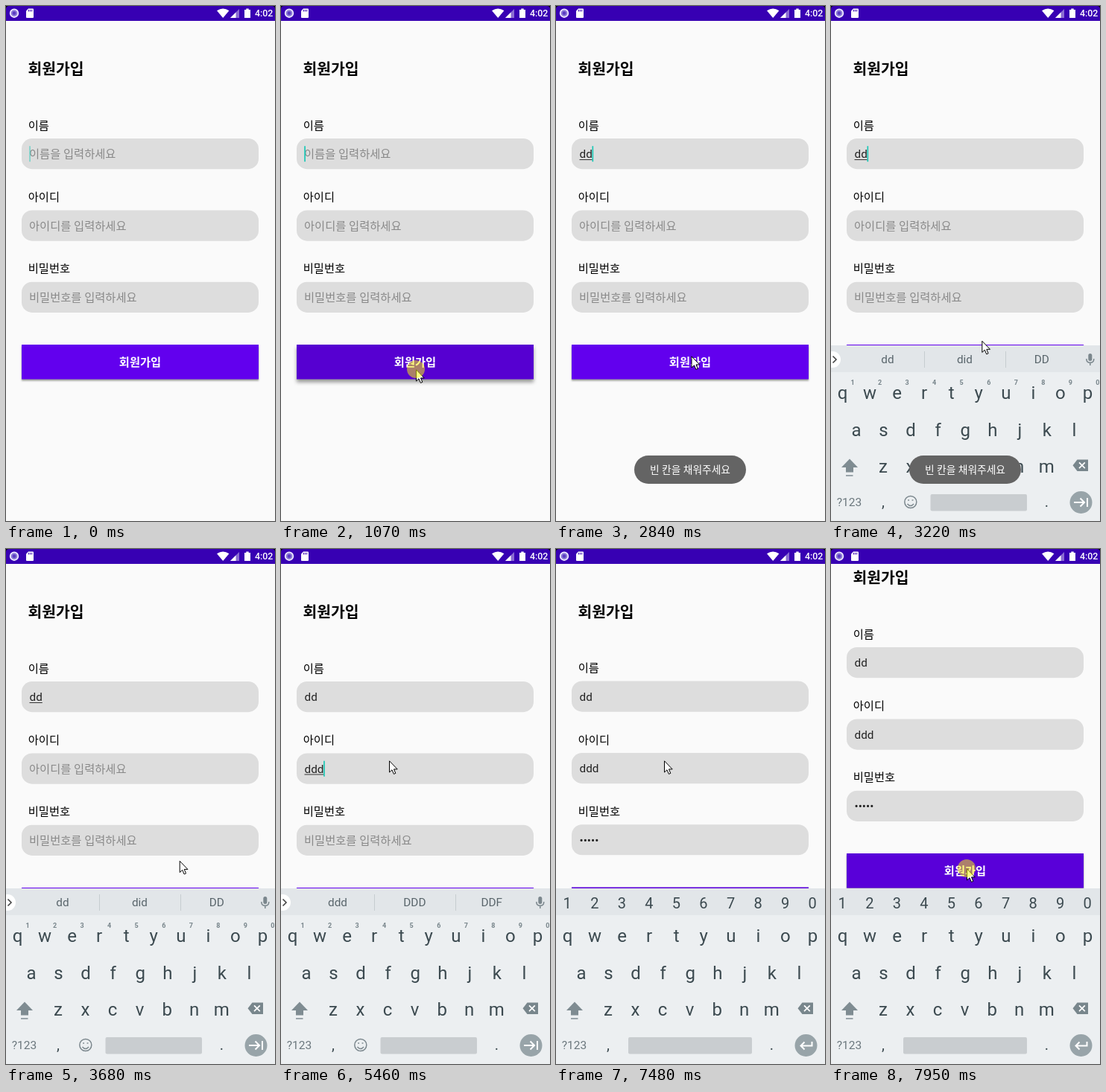
Write an HTML page that moves like this. It is 361 by 692 pixels and loops after 8 s.

```html
<!DOCTYPE html>
<html lang="ko">
<head>
<meta charset="utf-8">
<style>
html, body { margin: 0; width: 100%; height: 100%; overflow: hidden; background: #fafafa; }
svg { display: block; width: 361px; height: 692px; font: 15.3px Roboto, "Noto Sans CJK KR", "Noto Sans CJK", sans-serif; }
.bold { font-weight: 700; }
.hint { fill: #898989; }
.typed { fill: #222; }
.keys { font-size: 24px; fill: #3c4a50; text-anchor: middle; }
.mid { text-anchor: middle; }
#button { filter: drop-shadow(0 2px 1.2px rgba(0, 0, 0, .4)); }
</style>
</head>
<body>
<svg viewBox="0 0 361 692">
  <g id="page">
    <text class="bold" x="29.5" y="92.3" font-size="20.4">회원가입</text>
    <g id="fields"></g>
    <rect id="caret" width="1.7" height="21" fill="#1cc8b6"/>
    <g id="button">
      <rect x="21" y="455" width="318" height="46.5" fill="#6200ee"/>
      <rect id="press" x="21" y="455" width="318" height="46.5"/>
    </g>
    <text class="bold mid" x="180" y="483.7" fill="#fff">회원가입</text>
  </g>

  <g id="status">
    <rect width="361" height="20" fill="#3700b3"/>
    <path d="M0 0H4Q0 0 0 4ZM361 0V4Q361 0 357 0Z"/>
    <circle cx="11" cy="9.7" r="5.3" fill="#8f7ed6" stroke="#eeeaff" stroke-width="1.8"/>
    <circle cx="11" cy="9.7" r="2.4" fill="#5a3cc4"/>
    <path d="M30 3.5H36Q37 3.5 37 4.5V15Q37 16 36 16H28Q27 16 27 15V6.5Z" fill="#fff"/>
    <path d="M30.5 5V7.5M32.6 5V7.5M34.7 5V7.5" stroke="#3700b3"/>
    <path d="M291.2 16L283 6.3Q291.2 .8 299.4 6.3Z" fill="#fff"/>
    <path d="M301 16H313V4Z" fill="#8a6cd2"/>
    <path d="M301 16H308.5V8.5Z" fill="#fff"/>
    <path d="M320 5H322.3V3.5H325.7V5H328V16H320Z" fill="#fff"/>
    <text x="334" y="14.2" font-size="12.4" font-weight="500" fill="#fff">4:02</text>
  </g>

  <g id="keyboard">
    <rect y="456" width="361" height="236" fill="#eceff1"/>
    <rect y="456" width="361" height="36" fill="#e2e6e9"/>
    <g id="letters" class="keys"></g>
    <g id="plain">
      <circle cx="2" cy="475" r="11" fill="#fff"/>
      <path d="M2.5 470.5L7 475L2.5 479.5" fill="none" stroke="#444" stroke-width="1.6"/>
      <path d="M125.5 464V486M234.5 464V486" stroke="#c6ccd0"/>
      <g id="words" class="mid" fill="#59656b"></g>
      <rect x="345.3" y="467" width="5" height="10" rx="2.5" fill="#7b878d"/>
      <path d="M342.8 474Q342.8 479.3 347.8 479.3T352.8 474M347.8 479.3V483" fill="none" stroke="#7b878d" stroke-width="1.5"/>
      <g id="corner" class="mid bold" font-size="9" fill="#78858b"></g>
      <g fill="none" stroke="#7b878d" stroke-width="1.5">
        <circle cx="106.8" cy="666.5" r="8"/>
        <path d="M102.5 669Q106.8 674 111 669M103.2 664H105M108.6 664H110.4"/>
      </g>
    </g>
    <g id="digits" class="keys" style="font-size:20px"></g>
    <path d="M25 608.5L36 620H30V626.5H20V620H14ZM20 630.3H29.5V631.7H20Z" fill="#7f8c92"/>
    <path d="M330.5 609.5H345V625H330.5L324.5 617.2Z" fill="#78868c"/>
    <path d="M333 613.3L340.8 621.1M340.8 613.3L333 621.1" stroke="#fff" stroke-width="1.7"/>
    <text class="mid" x="24.5" y="672" font-size="15.5" fill="#6b777d">?123</text>
    <text class="keys" x="70" y="673" style="font-size:20px">,</text>
    <text class="keys" x="289.5" y="673" style="font-size:20px">.</text>
    <rect id="space" y="656" height="22.5" rx="2" fill="#c9cdd0"/>
    <circle cx="335.5" cy="667" r="15" fill="#98a4a9"/>
    <path id="enter" fill="none" stroke="#fff" stroke-width="2"/>
  </g>

  <g id="toast">
    <rect x="105" y="604" width="150" height="38" rx="19" fill="#646464"/>
    <text class="mid" x="180" y="628.2" font-size="13.75" fill="#fff">빈 칸을 채워주세요</text>
  </g>

  <path id="mouse" d="M.5 .8V16L4 12.8L6.4 18.4L8.8 17.4L6.5 11.9H11.2Z" fill="#fff" stroke="#000"/>
  <circle id="click" r="12" fill="#ff0" fill-opacity=".5"/>
</svg>

<script>
const LOOP = 8000;
const $ = id => document.getElementById(id);
const set = (id, attrs) => { for (const k in attrs) $(id).setAttribute(k, attrs[k]); };
const show = (id, on) => set(id, { opacity: +on });
const clamp = v => Math.min(1, Math.max(0, v));
const part = (t, from, to) => clamp((t - from) / (to - from));
const easeOut = p => 1 - (1 - p) ** 3;
const within = (t, spans) => spans.some(([a, b]) => t >= a && t < b);
const count = (t, times) => times.filter(at => t >= at).length;
const row = (text, x, y, step = 36.55) =>
  [...text].map((c, i) => `<text x="${x + i * step}" y="${y}">${c}</text>`).join("");

// Form fields
const labels = ["이름", "아이디", "비밀번호"];
const hints = ["이름을", "아이디를", "비밀번호를"];
const fieldTop = [178, 274.5, 370.7];
$("fields").innerHTML = fieldTop.map((y, i) => `
  <text x="29.8" y="${y - 12.4}">${labels[i]}</text>
  <rect x="21" y="${y}" width="318" height="41.2" rx="14" fill="#ddd"/>
  <text id="hint${i}" class="hint" x="31" y="${y + 26.2}">${hints[i]} 입력하세요</text>
  <text id="typed${i}" class="typed" x="31.5" y="${y + 26.4}"></text>
  <rect id="line${i}" x="31.5" y="${y + 28}" height="1" fill="#333"/>`).join("");

// Keyboard
$("letters").innerHTML = row("qwertyuiop", 15.5, 528) + row("asdfghjkl", 34, 577.5) + row("zxcvbnm", 70, 627);
$("digits").innerHTML = row("1234567890", 15.2, 483);
$("corner").innerHTML = row("1234567890", 29, 508.5);
$("words").innerHTML = row("   ", 76, 480.3, 103.4);
const NEXT = "M326 667H340M334.5 661.5L340 667L334.5 672.5M344 661V673";
const RETURN = "M343.5 662V667.5H328.5M333.5 662.5L328.5 667.5L333.5 672.5";

const suggestions = [
  [0, "dd did DD"], [4850, "  "], [5150, "d do does"], [5230, "dd did DD"], [5460, "ddd DDD DDF"]
];

const caretOn = [[0, 70], [680, 1150], [1680, 2180], [2640, 3300], [3800, 4300], [4680, 7480]];

// time, x, y of the pointer tip
const path = [
  [70, 274, 290], [300, 181, 328], [600, 181, 509], [750, 181, 488],
  [2040, 181, 488], [2280, 125, 325], [2460, 145, 240], [2840, 181.5, 470],
  [2910, 181.5, 470], [3680, 233, 419], [3990, 145, 272], [4149, 145, 272], [4150, 145, 284],
  [7500, 145, 284], [7880, 182, 429], [LOOP, 182, 429]
];

function pointer(t) {
  const i = Math.max(1, path.findIndex(p => p[0] > t));
  const [a, b] = [path[i - 1], path[i]];
  const p = part(t, a[0], b[0]);
  return [a[1] + (b[1] - a[1]) * p, a[2] + (b[2] - a[2]) * p];
}

function typedText(t) {
  const pass = count(t, [6240, 6470, 6620, 6790, 6940]);
  const done = t >= 7480;
  return [
    "d".repeat(count(t, [2640, 2800])),
    "d".repeat(count(t, [5150, 5230, 5380])),
    done ? "•".repeat(pass) : pass ? "•".repeat(pass - 1) + "d" : ""
  ];
}

function drawFields(t) {
  const focus = count(t, [4680, 5840]);
  typedText(t).forEach((s, i) => {
    const el = $("typed" + i);
    if (el.textContent !== s) el.textContent = s;
    show("hint" + i, !s);
    const width = s ? el.getComputedTextLength() : 0;
    set("line" + i, { width: i < 2 && i === focus ? width : 0 });
    if (i === focus) set("caret", { x: 31.2 + width, y: fieldTop[i] + 10.2 });
  });
  set("caret", { opacity: within(t, caretOn) ? (t < 70 ? .5 : 1) : 0 });
}

function drawKeyboard(t) {
  const rise = easeOut(part(t, 2890, 3170));
  const secret = t >= 5930;
  set("keyboard", { opacity: rise, transform: `translate(0 ${24 * (1 - rise)})` });
  show("plain", !secret);
  show("digits", secret);
  set("space", { x: secret ? 97 : 133.5, width: secret ? 166 : 129.5 });
  set("enter", { d: t < 7480 ? NEXT : RETURN });
  const words = suggestions.filter(s => t >= s[0]).pop()[1].split(" ");
  [...$("words").children].forEach((el, i) => { el.textContent = words[i]; });
}

function draw(t) {
  const pan = 46 * easeOut(part(t, 7480, 7730));
  set("page", { transform: `translate(0 ${-pan})` });
  drawFields(t);
  drawKeyboard(t);

  const press = part(t, 900, 1000) * (1 - part(t, 1260, 1530));
  set("press", { opacity: t >= 7480 ? .09 : .12 * press });
  $("button").style.filter = press
    ? `drop-shadow(0 ${2 + 2 * press}px ${1.2 + 1.3 * press}px rgba(0,0,0,.4))` : "";

  const fadeIn = t < 1300 ? 0 : t < 1680 ? Math.min(.82, (t - 1220) / 380) : 1;
  set("toast", { opacity: fadeIn * (1 - part(t, 3300, 3600)) });

  const [x, y] = pointer(t);
  set("mouse", { transform: `translate(${x} ${y})`, opacity: +(t >= 70) });
  set("click", { cx: x, cy: y, opacity: +within(t, [[920, 1075], [7880, LOOP]]) });
}

function frame() {
  draw(performance.now() % LOOP);
  requestAnimationFrame(frame);
}
frame();
</script>
</body>
</html>
```
